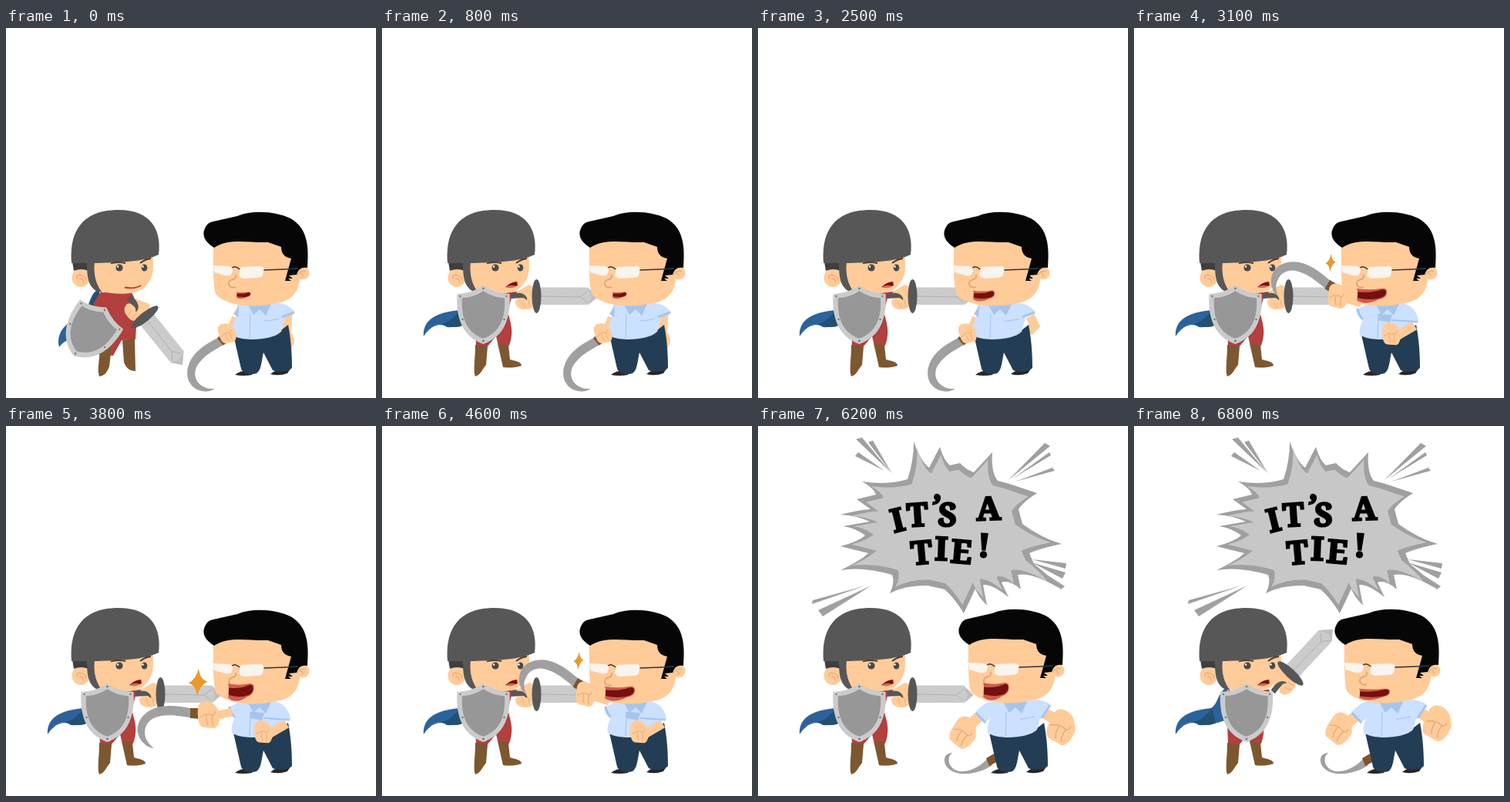
An HTML page with a canvas that plays this animation: 480x480 px, repeating every 7000 ms.

```html
<!DOCTYPE html>
<html lang="en">
<head>
<meta charset="utf-8">
<title>Duel</title>
<style>
html, body { margin: 0; width: 100%; height: 100%; overflow: hidden; background: #fff; }
canvas { display: block; width: 480px; height: 480px; }
</style>
</head>
<body>
<canvas id="stage" width="480" height="480"></canvas>
<script>
const c = document.getElementById('stage').getContext('2d');
const LOOP = 7000;
const SKIN = '#ffcb99', CREASE = '#e0a673', STEEL = '#575757', GRAY = '#a0a0a0',
  RED = '#b1403e', BOOT = '#7d5730', SHIRT = '#cce0ff', FOLD = '#a5c5ec',
  NAVY = '#233d55', BLACK = '#060606';

function fill(d, color) {
  c.fillStyle = color;
  c.fill(new Path2D(d));
}
function line(d, color, width) {
  c.strokeStyle = color;
  c.lineWidth = width;
  c.stroke(new Path2D(d));
}
function oval(x, y, rx, ry, color) {
  c.fillStyle = color;
  c.beginPath();
  c.ellipse(x, y, rx, ry, 0, 0, 7);
  c.fill();
}
function at(x, y, deg, sx, draw, sy = sx) {
  c.save();
  c.translate(x, y);
  c.rotate(deg * Math.PI / 180);
  c.scale(sx, sy);
  draw();
  c.restore();
}
const mix = (a, b, u) => a + (b - a) * u;

// Knight: sword and shield are [x, y, degrees]
const KNIGHT = {
  rest:  { dx: 0, sword: [180, 375, 51], shield: [109, 394, 34] },
  guard: { dx: -1, sword: [180, 375, 51], shield: [126, 386.5, 0] },
  point: { dx: 0, wide: true, sword: [200.5, 348, 0], shield: [131.5, 372, 0] },
  lunge: { dx: 14, wide: true, sword: [200.5, 348, 0], shield: [127, 386.5, 0] },
  raise: { dx: 0, wide: true, sword: [203, 321, -47], shield: [146, 372, 0] }
};

function shield() {
  const d = 'M0 -38Q-17 -27 -34 -27C-36 8 -25 29 0 38C25 29 36 8 34 -27Q17 -27 0 -38Z';
  fill(d, '#cbcbcb');
  at(0, 0, 0, .81, () => fill(d, '#979797'));
  for (const [x, y] of [[0, -34], [0, 34], [30, -24], [27, 6]])
    for (const s of [-1, 1]) oval(x * s, y, 1.3, 1.3, '#808080');
}

function sword() {
  fill('M2 -11.5L66 -11.5L79 1L67 11L2 11Z', '#cbcbcb');
  fill('M66 -11.5L79 1L67 11L71 1Z', '#bfbfbf');
  line('M5 0L57 1L66 -7M57 1L66 8', '#aaa', .8);
  fill('M-27 -5L-10 -15Q1 -13 -1 0Q-2 17 -12 17Q-25 18 -27 10Q-30 4 -20 2Z', SKIN);
  fill('M-33 -4Q-13 -7 -12 5L-17 2L-33 3Z', STEEL);
  line('M-18 7Q-18 12 -14 15M-10 5Q-11 11 -8 14', CREASE, .8);
  oval(0, 0, 6, 22, STEEL);
}

function knightBody(wide) {
  if (wide) {
    fill('M121 339C108 345 110 360 100 366C80 368 52 374 54 400C64 385 76 382 84 388C95 389 106 386 124 380Z', '#2c629a');
    fill('M101 366Q88 383 77 384C89 390 103 388 106 385Z', '#234f70');
    fill('M122 343H170L163 368C168 385 171 395 165 412H151L148 400L136 414L122 412L120 360Z', RED);
    line('M148 350L176 345', RED, 7);
    fill('M121 411L137 413L135 437C130 443 128 450 121 452C118 444 121 430 121 411Z', BOOT);
    fill('M150 409L164 411L166 430C173 432 181 433 181 438C173 441 164 441 157 440Z', BOOT);
  } else {
    fill('M121 338C106 345 110 365 96 376C80 380 64 394 69 414C75 406 82 404 86 404L120 380Z', '#2c629a');
    fill('M121 338C108 348 111 365 100 374L120 380Z', '#234f70');
    fill('M113 358L122 343H163Q170 355 170 372L168 404L150 405L139 425L121 424Z', RED);
    fill('M122 416L137 414L134 439C131 447 128 451 121 452C118 445 121 432 122 416Z', BOOT);
    fill('M151 405L167 403L168 445Q158 446 153 434Z', BOOT);
  }
}

function knightHead(open) {
  oval(97, 324, 11.5, 12, SKIN);
  line('M92 325Q92 318 98 321Q104 322 104 328M95 326Q100 323 101 331', CREASE, 1.2);
  fill('M108 298L190 293C193 315 190 328 178 338C165 347 138 346 122 341C110 332 110 318 108 298Z', SKIN);
  fill('M86 303L108 303L106 315Q98 311 88 315Z', '#3e3e3e');
  fill('M105 303L115 303C113 320 117 334 125 343L117 341C106 334 105 322 105 303Z', STEEL);
  fill('M85 305C82 270 94 236 146 236C188 236 202 262 198 294C180 303 150 304 118 305Z', STEEL);
  for (const x of [147, 179.5]) {
    oval(x, 311, x < 150 ? 4.6 : 3.8, 4.5, '#494949');
    oval(x - 2, 309.5, 1.3, 1.3, '#fff');
  }
  line('M136 305.5Q146 303 155 305M174 305Q180 300 188 299', '#4c3a2c', 1.8);
  if (open) {
    fill('M160 336Q168 329 175 329L176 334Q170 337 160 336Z', '#76120f');
    fill('M160 336Q167 332 174 335Q168 339 160 336Z', '#d8674f');
  } else line('M154 336.5Q167 339 175 334', '#b44032', 1.8);
}

function knight(name) {
  const k = KNIGHT[name];
  at(k.dx, 0, 0, 1, () => {
    knightBody(k.wide);
    knightHead(k.wide);
    at(...k.sword, 1, sword);
    at(...k.shield, 1, shield);
  });
}

// Man
function hand() {
  fill('M-14 -9C-13 -20 1 -20 8 -13L14 -4C16 5 12 18 6 17L-6 16C-13 16 -15 4 -14 -9Z', SKIN);
  line('M-12 3Q-3 -3 4 0Q9 0 8 -5M-3 0Q-4 8 -1 13M5 0Q3 8 6 14', CREASE, 1);
}

function sickle() {
  fill('M0 -6C-20 -10 -34 -12 -50 -7C-71 1 -80 22 -65 38Q-58 45 -51 45C-69 32 -65 11 -49 5C-33 0 -20 3 0 6Z', GRAY);
  fill('M-4 -7L9 -7L9 7L-4 6Z', '#7b5530');
}

function trousers() {
  fill('M297 450Q304 443 322 444L319 450Q308 452 297 450ZM343 449Q350 442 369 442L365 448Q354 452 343 449Z', '#262626');
  fill('M295 398L357 392L366 385C370 405 371 425 371 441C365 447 352 447 346 444L334 421C331 435 331 444 325 448C316 451 307 447 305 442Z', NAVY);
}

function shirt(kind) {
  fill('M300 358L350 356L362 376L357 394C345 406 305 407 293 398C291 388 297 380 299 372Z', SHIRT);
  fill('M313 358L321 372L329 365L337 373L344 358Z', FOLD);
  line('M317 371L316 403', FOLD, 1);
  if (kind === 'hit') {
    fill('M317 371L335 372L332 382L317 379Z', FOLD);
    line('M317 371L334 373', FOLD, 1.2);
  } else line('M335 380Q345 380 354 377', FOLD, 1.2);
}

function mouth(x, y, w, h) {
  at(x, y, 0, w, () => {
    fill('M0 .05Q.45 .18 .8 .05Q1.02 0 1 .35Q.98 .7 .75 .78Q.3 1.25 0 .85Q.08 .45 0 .05Z', '#cf5b4d');
    fill('M.03 .28Q.45 .38 .82 .13Q1 .05 .97 .4Q.93 .66 .7 .74Q.4 .86 .02 .7Z', '#76100f');
  }, h);
}

function manHead(m) {
  fill('M269 280C290 270 330 272 360 280L380 315C385 340 370 355 350 357C325 364 285 361 272 345Q268 335 269 280Z', SKIN);
  oval(385, 318, 8.5, 8.5, SKIN);
  line('M378 321Q381 314 389 316M382 318Q385 318 385 323', CREASE, 1.1);
  fill('M270 285C257 277 254 268 258 260Q261 252 269 251L300 244C322 235 352 239 369 247C392 260 393 285 391 311Q380 309 377 320L367 321L372 325L366 325L370 328L362 328L370 299Q357 297 357 284L340 278C315 279 290 272 270 285Z', BLACK);
  line('M298 320C300 329 288 324 289 332Q290 338 298 336', CREASE, 1.8);
  line('M292 312Q297 307 303 313M334 314L362 313', '#333', 1.5);
  line('M362 313L379 312', '#1d4050', 1.3);
  fill('M269 308L289 309Q295 310 294 315L292 320Q290 322 284 321L270 317Z', '#f8f4ee');
  fill('M305 310L331 309Q336 310 334 316L333 321Q331 324 325 324L309 325Q302 324 302 319Z', '#f8f4ee');
  mouth(...m);
}

const MOUTH = {
  small: [299, 342, 18.5, 9], talk: [294, 340, 28, 14],
  wide: [288, 333, 33.5, 23], bite: [289, 337, 39, 19], shout: [288, 341, 40, 15]
};

function star(x, y, w, h) {
  const a = w * .2, b = h * .2;
  at(x, y, 0, 1, () =>
    fill(`M1 ${-h}Q${a} ${-b} ${w} -1Q${a} ${b} -1 ${h}Q${-a} ${b} ${-w} 1Q${-a} ${-b} 1 ${-h}Z`, '#e8992a'));
}

function manRest(dx) {
  at(dx, 0, 0, 1, () => {
    at(281, 405, -39, .94, sickle);
    line('M299 376L290 396', SKIN, 12);
    if (dx < 0) {
      line('M368 374L374 386L366 394', SKIN, 12);
    } else {
      line('M365 370L363 398', SKIN, 13);
      at(363, 405, 15, .76, hand);
    }
    trousers();
    shirt('rest');
    fill('M350 357Q362 355 375 368L358 377Z', SHIRT);
    line('M358 375L374 369', FOLD, 3);
    fill('M302 360L295 371L301 375Z', FOLD);
    at(287, 396, -15, .76, hand);
    manHead(MOUTH[dx < 0 ? 'talk' : 'small']);
  });
}

// u runs from the low swing (0) to the high swing (1)
function manHit(u) {
  trousers();
  shirt('hit');
  line('M364 386L340 400', SKIN, 12);
  fill('M345 357Q364 358 369 379L368 383L346 381Z', SHIRT);
  line('M334 379L368 381', FOLD, 2);
  at(334, 397, 0, .84, hand);
  fill('M304 358L288 365Q289 373 295 378L308 374Z', SHIRT);
  line('M290 364Q291 372 297 378', FOLD, 3);
  line(`M${mix(293, 295, u)} ${mix(371, 357, u)}L268 ${mix(377, 349, u)}`, SKIN, 11);
  manHead(MOUTH[u > .7 ? 'bite' : 'wide']);
  at(mix(243, 254, u), mix(373, 335, u), 30 * u, 1, sickle);
  at(mix(263, 264.5, u), mix(375, 348, u), 8 * u, mix(1, .9, u), hand);
  if (u === 0) star(249, 332.5, 12.5, 18);
  if (u === 1) star(255, 304.5, 6.5, 12);
}

function manTie(drop) {
  fill('M297 432C283 448 255 456 248 437Q246 428 252 424C242 424 239 434 245 442C255 456 285 453 304 440Z', GRAY);
  fill('M296 431L308 424L313 434L300 441Z', '#7b5530');
  at(5, 0, 0, 1, () => {
    trousers();
    line('M289 370L268 390M365 371L382 382', SKIN, 14);
    shirt('tie');
    fill('M303 357Q288 357 276 373L289 386L304 372Z', SHIRT);
    fill('M345 357Q361 352 374 361L362 380L350 374Z', SHIRT);
    line('M278 372L290 385M374 362L363 379', FOLD, 3);
  });
  at(4, -1, 0, 1, () => manHead(MOUTH[drop ? 'wide' : 'shout']));
  at(267, 393 + drop, 35, 1.13, hand);
  at(394, 386 + drop, 25, 1.24, hand);
}

const MAN = {
  rest: () => manRest(0), back: () => manRest(12), lean: () => manRest(-15),
  low: () => manHit(0), mid: () => manHit(.5), high: () => manHit(1),
  tie: () => manTie(0), tieLow: () => manTie(5)
};

function burst() {
  const shape = 'M202 20Q211 46 222 54L236 27Q241 45 249 51L262 48Q270 57 280 60L304 34Q302 60 311 71L326 75L362 87' +
    'Q343 99 338 108L343 127Q367 145 394 153Q365 159 352 165L358 179Q378 194 390 210Q356 190 337 193L341 212Q326 199 316 203L325 222' +
    'Q304 205 292 206L297 233Q284 219 282 211L267 243Q254 222 242 212L220 207Q192 206 171 217Q178 202 174 193Q136 182 107 187' +
    'Q134 174 143 165L107 156Q130 150 139 142Q126 132 110 130L145 124Q128 116 107 115Q135 108 146 108L128 95L153 89Q151 81 135 72Q169 77 194 69Q202 46 202 20Z';
  fill(shape, GRAY);
  at(249, 132, 0, .9, () => at(-249, -132, 0, 1, () => fill(shape, '#c7c7c7')));
  fill('M127 17L135 15L172 60ZM143 21L149 19L174 62ZM126 39L130 34L164 58Z' +
    'M372 22L379 26L325 70ZM378 34L380 38L331 68ZM382 54L385 58L334 72Z' +
    'M400 178L399 185L355 173ZM399 190L395 198L355 177ZM398 208L393 212L358 182Z' +
    'M71 226L70 231L140 207ZM78 239L84 247L147 207Z', GRAY);
  c.font = '900 42px "Noto Serif", serif';
  c.textAlign = 'center';
  c.fillStyle = c.strokeStyle = '#000';
  c.lineWidth = 2.4;
  const letters = [['I', 181, 122, -14], ['T', 207, 115, -4], ['’', 231, 104, 8], ['S', 246, 115, 3], ['A', 299, 107, -2],
    ['T', 212, 164, -5], ['I', 238, 159, 2], ['E', 264, 163, 5], ['!', 293, 155, 3]];
  for (const [ch, x, y, deg] of letters)
    at(x, y, deg, 1, () => {
      c.fillText(ch, 0, 15);
      c.strokeText(ch, 0, 15);
    });
}

// Start time, knight pose, man pose
const SCRIPT = `
0 rest rest, 200 guard rest, 400 point rest, 600 lunge back, 800 point rest, 1000 lunge low, 1200 lunge mid,
1400 lunge high, 1600 lunge mid, 1800 lunge low, 2000 lunge back, 2200 point back, 2400 point rest,
2500 point lean, 2600 point rest, 2700 point lean, 2800 point rest, 2900 point mid, 3000 point high, 3200 point low,
3400 point high, 3600 point mid, 3800 point low, 4000 point high, 4200 point mid, 4400 point low, 4600 point high,
4800 point mid, 5000 point low, 5200 point high, 5300 guard mid, 5400 rest low, 5500 guard high,
5600 guard low, 5800 point high, 6000 raise tie, 6200 point tieLow, 6400 raise tie, 6600 point tieLow, 6800 raise tie`
  .split(',').map(s => s.trim().split(' '));

function frame() {
  const t = performance.now() % LOOP;
  const [, k, m] = SCRIPT.filter(row => +row[0] <= t).pop();
  c.clearRect(0, 0, 480, 480);
  if (t >= 5800) burst();
  knight(k);
  MAN[m]();
  requestAnimationFrame(frame);
}
frame();
</script>
</body>
</html>
```
